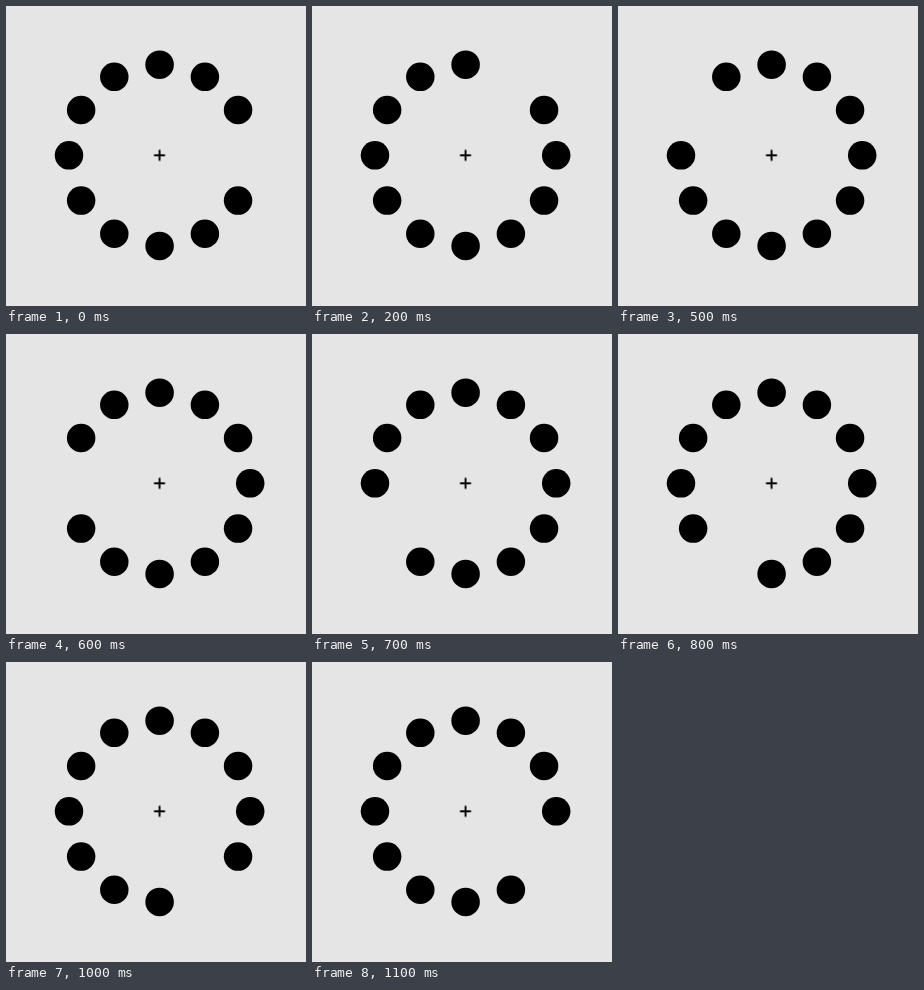
An HTML page for the animation above (1.2 s loop, 300 by 300 pixels).

```html
<!DOCTYPE html>
<html lang="en">
<head>
<meta charset="utf-8">
<title>Ring of dots with a travelling gap</title>
<style>
  html, body { margin: 0; width: 100%; height: 100%; overflow: hidden; background: #e5e5e5; }
  svg { display: block; width: 100%; height: 100%; }
  .cross { stroke: #000; stroke-width: 1.9; }
  /* A background-coloured disc hides one dot at a time, counterclockwise. */
  .gap { fill: #e5e5e5; transform-origin: 0 0; animation: travel 1200ms steps(12, end) infinite; }
  @keyframes travel {
    from { transform: rotate(0deg); }
    to { transform: rotate(-360deg); }
  }
</style>
</head>
<body>
<svg viewBox="0 0 300 300">
  <g transform="translate(153.6 149.3)">
    <g id="dots"></g>
    <circle class="gap" cx="90.6" cy="0" r="17"/>
    <path class="cross" d="M-5.6 0H5.4M-.1 -5.4V5.6"/>
  </g>
</svg>
<script>
  const COUNT = 12, RING = 90.6, RADIUS = 14.25;
  const dots = document.getElementById('dots');
  for (let i = 0; i < COUNT; i++) {
    const angle = i * 2 * Math.PI / COUNT;
    const dot = document.createElementNS('http://www.w3.org/2000/svg', 'circle');
    dot.setAttribute('cx', RING * Math.cos(angle));
    dot.setAttribute('cy', RING * Math.sin(angle));
    dot.setAttribute('r', RADIUS);
    dots.append(dot);
  }
</script>
</body>
</html>
```
